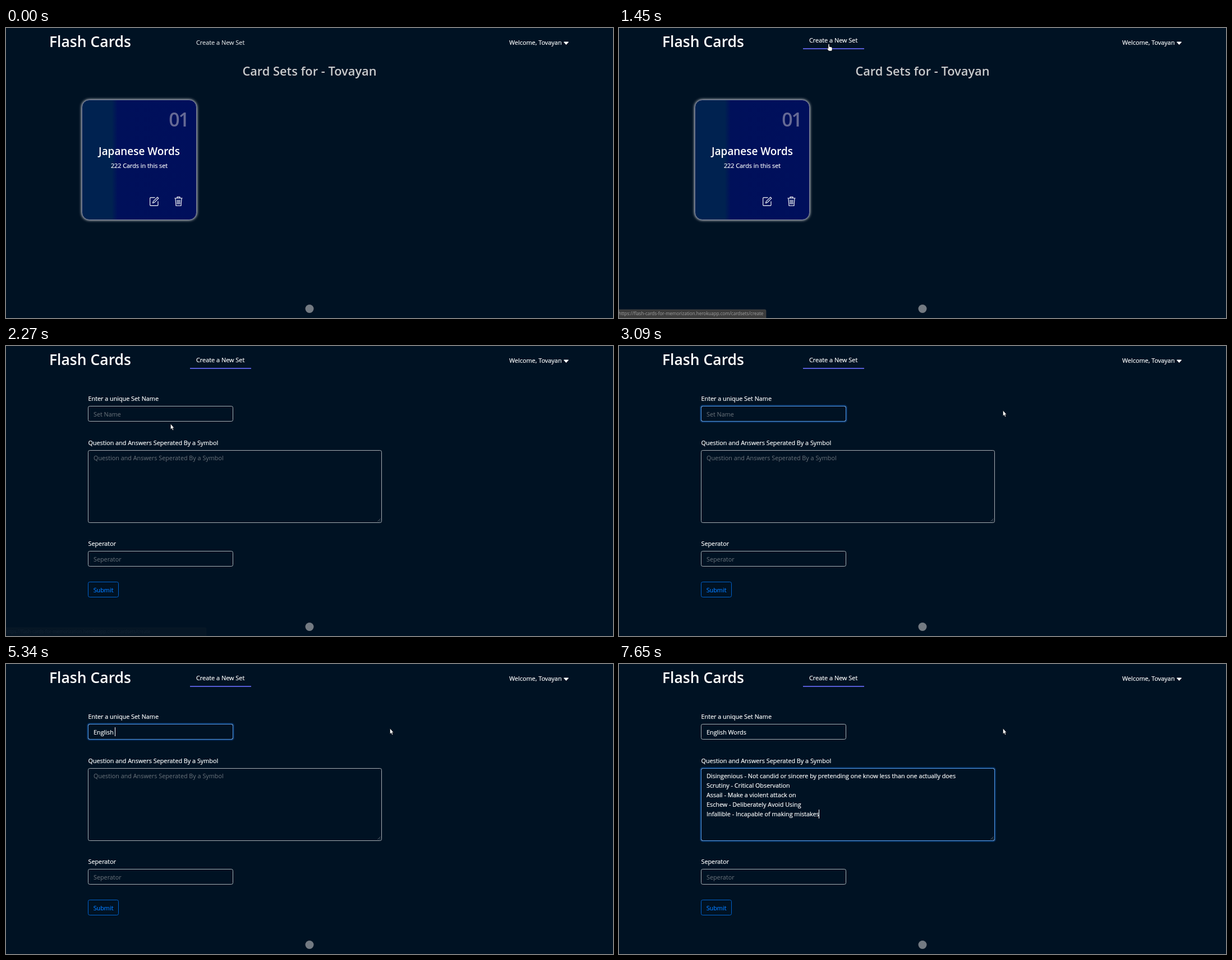
Animation of 1082x518 px, one loop 8 s. Source, as an HTML page:

```html
<!DOCTYPE html>
<html lang="en">
<head>
<meta charset="utf-8">
<title>Flash Cards</title>
<style>
  html, body { margin: 0; width: 100%; height: 100%; overflow: hidden; background: #001223; }
  svg { display: block; width: 1082px; height: 518px; }
  text {
    font: 10.8px "Open Sans", "Noto Sans", sans-serif;
    fill: #fff; stroke: #fff; stroke-width: .2; white-space: pre;
  }
  .heading { font-weight: 600; stroke: none; }
  .nav { font-size: 10.9px; }
  .hint { fill: #6c757d; stroke: none; }
  .submit { fill: #007bff; stroke: #007bff; }
  .address { font-size: 8.04px; fill: #a0a0a0; stroke: none; }
  .box { fill: none; stroke: #a8adb3; }
  .ring { fill: none; stroke: #007bff; stroke-opacity: .25; stroke-width: 2; }
  .edge { fill: none; stroke: #5b9be6; }
  .icon { fill: none; stroke: #fff; stroke-width: 1.15; stroke-linejoin: round; }
</style>
</head>
<body>
<svg viewBox="0 0 1082 518">
  <defs>
    <linearGradient id="cardFill">
      <stop offset="0" stop-color="#002250"/>
      <stop offset=".26" stop-color="#002250"/>
      <stop offset=".31" stop-color="#00105a"/>
      <stop offset="1" stop-color="#000f5c"/>
    </linearGradient>
  </defs>

  <text class="heading" x="77" y="33.5" style="font-size:26.5px">Flash Cards</text>
  <g id="link">
    <text class="nav" x="339" y="30">Create a New Set</text>
    <rect id="underline" x="328" y="40" width="109" height="2" fill="#575cd6"/>
  </g>
  <text class="nav" x="897" y="30">Welcome, Tovayan</text>
  <path d="M994.5 25h8l-4 4.5z" fill="#fff" stroke="#fff" stroke-linejoin="round"/>
  <circle cx="541" cy="501.5" r="7.5" fill="#737a82"/>

  <g id="home">
    <text class="heading" x="541" y="85" text-anchor="middle" style="font-size:21.8px;fill:#c9cacc">Card Sets for - Tovayan</text>
    <rect x="135.5" y="128.5" width="204" height="214" rx="13" fill="url(#cardFill)"
          stroke="#737994" style="filter:drop-shadow(0 0 2.8px #fff)"/>
    <text class="heading" x="325" y="176" text-anchor="end" style="font-size:34px;letter-spacing:-2px;fill:#666a95">01</text>
    <text class="heading" x="237.5" y="227" text-anchor="middle" style="font-size:18.9px">Japanese Words</text>
    <text x="237.5" y="250" text-anchor="middle">222 Cards in this set</text>
    <path class="icon" d="M265.5 302.8H258q-1.3 0-1.3 1.3v12q0 1.3 1.3 1.3h11.7q1.3 0 1.3-1.3V309.5M261.5 312.8l.8-2.9 7.7-7.7 1.9 1.9-7.6 7.7z"/>
    <path class="icon" d="M300.5 304h14M305 303.5v-1.7h5v1.7M302 304.5l1 13h9l1-13M305.2 307v8M307.5 307v8M309.8 307v8"/>
  </g>

  <g id="form">
    <text x="146.5" y="98">Enter a unique Set Name</text>
    <rect class="box" x="146.5" y="107.5" width="258" height="27" rx="2.8"/>
    <g id="nameFocus">
      <rect class="ring" x="145" y="106" width="261" height="30" rx="4"/>
      <rect class="edge" x="146.5" y="107.5" width="258" height="27" rx="2.8"/>
    </g>
    <text id="nameHint" class="hint" x="156" y="126">Set Name</text>
    <text id="name" x="156" y="126"></text>

    <text x="146.5" y="176.5">Question and Answers Seperated By a Symbol</text>
    <rect class="box" x="146.5" y="186.5" width="523" height="129" rx="2.8"/>
    <g id="cardsFocus">
      <rect class="ring" x="145" y="185" width="526" height="132" rx="4"/>
      <rect class="edge" x="146.5" y="186.5" width="523" height="129" rx="2.8"/>
    </g>
    <path d="M662.5 313.5l5-5M665.5 313.5l2-2" stroke="#737a82" stroke-width=".8"/>
    <text id="cardsHint" class="hint" x="156" y="204">Question and Answers Seperated By a Symbol</text>
    <g id="cards">
      <text x="156" y="204">Disingenious - Not candid or sincere by pretending one know less than one actually does</text>
      <text x="156" y="221">Scrutiny - Critical Observation</text>
      <text x="156" y="238">Assail - Make a violent attack on</text>
      <text x="156" y="255">Eschew - Deliberately Avoid Using</text>
      <text id="lastLine" x="156" y="272">Infallible - Incapable of making mistakes</text>
    </g>

    <text x="146.5" y="357">Seperator</text>
    <rect class="box" x="146.5" y="366.5" width="258" height="27" rx="2.8"/>
    <text class="hint" x="156" y="384.5">Seperator</text>
    <rect x="146.5" y="421.5" width="54" height="27" rx="2.8" fill="none" stroke="#0062cc"/>
    <text class="submit" x="155.7" y="439.5">Submit</text>
    <rect id="caret" width="1" height="16" fill="#fff"/>
  </g>

  <g id="status">
    <rect id="bubble" x="-3" y="503" height="18" rx="2" fill="#3c3c3c" stroke="#4a4a4a" stroke-width=".6"/>
    <text class="address" x="-1" y="513.3">https://flash-cards-for-memorization.herokuapp.com/cardsets/create</text>
  </g>

  <g id="cursor" fill="#fff" stroke="#000" stroke-width=".5">
    <path id="arrow" d="M0 0V10L2.1 8 3.7 11.5 5.2 10.8 3.7 7.5H6.3Z"/>
    <path id="hand" d="M-1 0Q0-1 1 0V4.2L5 5.2Q6 5.7 6 7V9.5L5 12H0L-3 8.2Q-3.5 6.3-1 7.5Z"/>
    <path id="beam" d="M-2-5.5Q0-5.5 0-4.5V4.5Q0 5.5-2 5.5M2-5.5Q0-5.5 0-4.5M2 5.5Q0 5.5 0 4.5" fill="none" stroke="#fff" stroke-width="1"/>
  </g>
</svg>
<script>
const LOOP = 8000, PAGE = 1650, FOCUS = 2560, SWITCH = 6890, PASTE = 7650, BLINK = 530;
const SET_NAME = 'English Words';
const keyTimes = [4250, 4480, 4600, 4910, 4990, 5060, 5140, 5340, 5660, 5910, 6000, 6320, 6640];
const mousePath = [
  [260, 1034, 512], [480, 800, 350], [700, 500, 130], [840, 395, 45], [1000, 374, 29],
  [1680, 374, 29], [1870, 357, 41], [1930, 357, 41], [2100, 325, 95], [2270, 293.5, 139],
  [2420, 276, 122], [2580, 276, 121], [2740, 599, 115], [2840, 684.5, 115]
];

const $ = id => document.getElementById(id);
const ramp = (t, from, to) => Math.min(1, Math.max(0, (t - from) / (to - from)));
const show = (id, on) => { $(id).style.opacity = +on; };

function mouseAt(t) {
  const next = mousePath.findIndex(p => p[0] > t);
  if (next < 0) return mousePath.at(-1).slice(1);
  const b = mousePath[next], a = mousePath[Math.max(0, next - 1)];
  const k = ramp(t, a[0], b[0]);
  return [a[1] + (b[1] - a[1]) * k, a[2] + (b[2] - a[2]) * k];
}

function drawLink(t) {
  const hover = ramp(t, 870, 990);
  const lift = 4 * hover - 3 * ramp(t, 1880, 2050);
  $('link').setAttribute('transform', `translate(0 ${-lift})`);
  $('link').style.opacity = .85 + .15 * hover;
  show('underline', hover);
}

function drawForm(t) {
  const typed = t >= 3460 && t < 3990 ? 'e' : SET_NAME.slice(0, keyTimes.filter(k => k <= t).length);
  const pasted = t >= PASTE, inCards = t >= SWITCH + 30;
  $('name').textContent = typed;
  show('nameHint', !typed);
  show('cardsHint', !pasted);
  show('cards', pasted);
  show('nameFocus', ramp(t, FOCUS, FOCUS + 150) - ramp(t, SWITCH, SWITCH + 150));
  show('cardsFocus', ramp(t, SWITCH, SWITCH + 150));

  // The caret restarts its blink at every edit.
  const edits = [FOCUS, 3460, 3990, ...keyTimes, SWITCH + 30, PASTE];
  const lastEdit = edits.findLast(e => e <= t);
  show('caret', t >= FOCUS && Math.floor((t - lastEdit) / BLINK) % 2 === 0);
  const line = inCards ? (pasted ? $('lastLine').getComputedTextLength() : 0)
                       : (typed ? $('name').getComputedTextLength() : 0);
  $('caret').setAttribute('x', Math.floor(156 + line));
  $('caret').setAttribute('y', inCards ? (pasted ? 260 : 192) : 113);
}

function drawCursor(t) {
  const [x, y] = mouseAt(t);
  const overLink = x > 328 && x < 437 && y < 40;
  const overField = t > PAGE && x > 147 && x < 404 && y > 108 && y < 135;
  $('cursor').setAttribute('transform', `translate(${x} ${y})`);
  show('cursor', t >= 260);
  show('hand', overLink);
  show('beam', overField);
  show('arrow', !overLink && !overField);
}

function frame() {
  const t = performance.now() % LOOP;
  show('home', t < PAGE);
  show('form', t >= PAGE);
  show('status', ramp(t, 1150, 1300) - ramp(t, 2110, 2290));
  $('bubble').setAttribute('width', 265 + 95 * ramp(t, 1690, 1800));
  drawLink(t);
  drawForm(t);
  drawCursor(t);
  requestAnimationFrame(frame);
}
frame();
</script>
</body>
</html>
```
